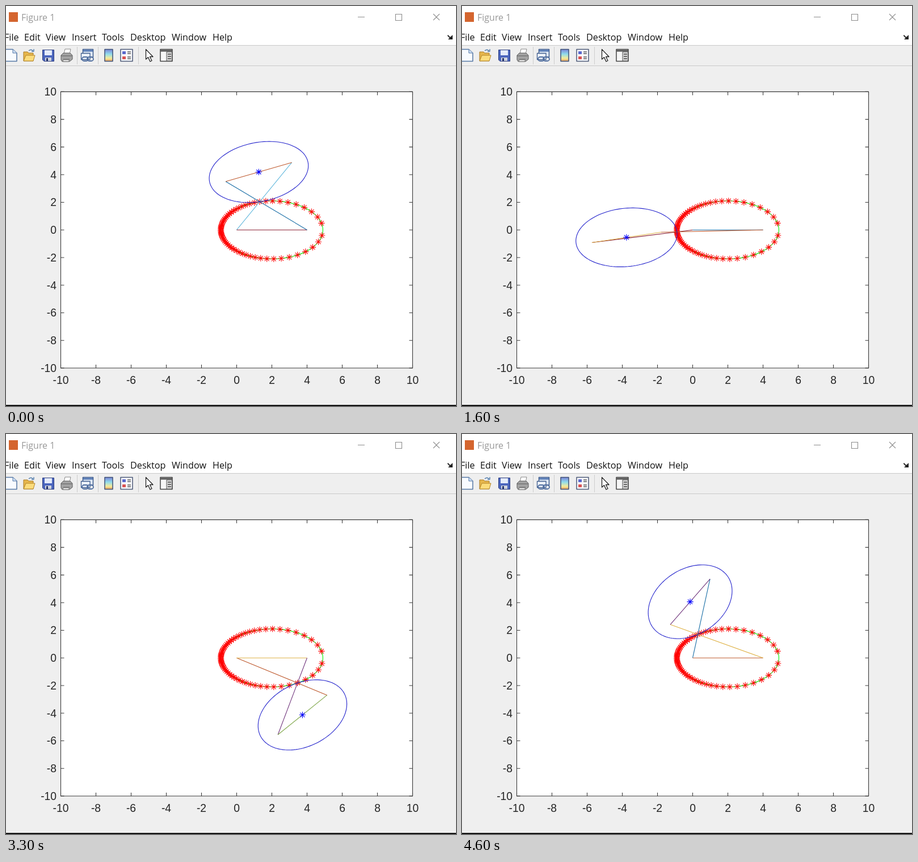
An HTML page for the animation above (4700 ms loop, 793x706 px).

```html
<!DOCTYPE html>
<html lang="en">
<head>
<meta charset="utf-8">
<title>Figure 1</title>
<style>
  html, body { margin: 0; width: 100%; height: 100%; overflow: hidden; background: #efefef; }
  svg { display: block; width: 793px; height: 706px; }
  .ui { font: 16.2px "Open Sans", "Noto Sans", sans-serif; }
  .tick { font: 19.3px "Liberation Sans", Arial, sans-serif; fill: #262626; }
  .thin { fill: none; stroke-width: 1.1; }
  #bars { filter: saturate(.75); }
</style>
</head>
<body>
<svg viewBox="0 0 793 706" xmlns="http://www.w3.org/2000/svg">
  <defs>
    <clipPath id="plotArea"><path class="box"/></clipPath>
    <linearGradient id="bar" x2="0" y2="1">
      <stop stop-color="#7d83d8"/><stop offset=".4" stop-color="#8fdcec"/>
      <stop offset=".75" stop-color="#f4ec9a"/><stop offset="1" stop-color="#eda05c"/>
    </linearGradient>
  </defs>

  <rect width="793" height="706" fill="#efefef"/>
  <rect width="793" height="69" fill="#fff"/>
  <path d="M0 69.5H793M0 105.5H793" stroke="#c9c9c9"/>
  <rect y="704" width="793" height="2" fill="#111"/>

  <!-- title bar -->
  <rect x="5" y="11" width="16" height="17" fill="#d4652f"/>
  <text class="ui" x="27" y="26" fill="#999" style="font-size:16px">Figure 1</text>
  <path d="M620 19.5H632M686.5 14.5H697.5V25.5H686.5ZM753 14L764 25M764 14L753 25" fill="none" stroke="#8c8c8c" stroke-width="1.1"/>

  <g class="ui" id="menu" fill="#111"></g>
  <path d="M778.5 51.5Q781 56 785 56" fill="none" stroke="#222" stroke-width="1.8"/>
  <path d="M787 51V59H779Z" fill="#222"/>

  <!-- toolbar -->
  <path d="M125.5 72V103M162.5 72V103M233.5 72V103" stroke="#cdcdcd"/>
  <g stroke-linejoin="round">
    <path d="M-2 76.5H12L19 83V97.5H-2Z" fill="#f8fbff" stroke="#5577a5" stroke-width="1.5"/>
    <path d="M12 76.5V83H19" fill="#cfe0f5" stroke="#5577a5"/>

    <path d="M31 97V81H38L40 83H48V97Z" fill="#e6b64c" stroke="#a97b25"/>
    <path d="M31 97L35 87H51L48 97Z" fill="#fbdc7c" stroke="#b48529"/>
    <path d="M40 79Q45 75 48 80M45 80H49V76" fill="none" stroke="#557fae" stroke-width="1.4"/>

    <path d="M64.5 77.5H84.5V97.5H67L64.5 95Z" fill="#4b65bd" stroke="#2c3d80"/>
    <path d="M68 78H81V87H68Z" fill="#e4ebfa"/>
    <path d="M69 91H80V97H69Z" fill="#cfd3dc"/>
    <path d="M71 92H74V97H71Z" fill="#26356e"/>

    <path d="M102 85L104 76H114L112 85Z" fill="#fff" stroke="#888"/>
    <path d="M97 87L101 83H113L117 87V94L112 98H99L97 95Z" fill="#a4a4a4" stroke="#5c5c5c"/>
    <path d="M97 88H116M101 94H112" stroke="#5c5c5c"/>
    <path d="M100 95H112L110 98H101Z" fill="#f5f5f5" stroke="#777"/>

    <path d="M135.5 76.5H153.5V90.5H135.5Z" fill="#dfe8f5" stroke="#3f5c8d" stroke-width="1.5"/>
    <path d="M136 79H153" stroke="#5277b3" stroke-width="3"/>
    <path d="M132.5 83.5H148V94.5H132.5Z" fill="#edf2fa" stroke="#3f5c8d" stroke-width="1.3"/>
    <g fill="none" stroke="#4d6c9e" stroke-width="1.8">
      <rect x="134" y="90" width="11" height="7" rx="3.5"/><rect x="143" y="90" width="11" height="7" rx="3.5"/>
    </g>

    <rect x="174" y="76.5" width="14" height="21" fill="url(#bar)" stroke="#3f5277" stroke-width="1.5"/>

    <rect x="202" y="76.5" width="21" height="21" fill="#fafbfe" stroke="#4d5a78" stroke-width="1.5"/>
    <path d="M205 80H211V85H205Z" fill="#5a68cc"/>
    <path d="M205 89H211V94H205Z" fill="#d85353"/>
    <path d="M214 81H220M214 84H220M214 90H220M214 93H220" stroke="#555" stroke-width="1.3"/>

    <path d="M246.5 76.5V94L250.5 90.5L254 98L257 96.5L253.5 89.5H259Z" fill="#fff" stroke="#222" stroke-width="1.3"/>

    <rect x="272" y="76.5" width="21" height="21" fill="#f6f6f6" stroke="#444" stroke-width="1.5"/>
    <path d="M272 79H293" stroke="#555" stroke-width="3"/>
    <path d="M283 81H292.5V97H283Z" fill="#d9d9d9" stroke="#555"/>
    <path d="M285 85H291M285 89H291M285 93H291" stroke="#444" stroke-width="1.4"/>
  </g>

  <!-- axes -->
  <path class="box" fill="#fff" stroke="#3a3a3a" stroke-width="1.1"/>
  <path id="ticks" class="thin" stroke="#3a3a3a"/>
  <g id="labels" class="tick"></g>

  <g clip-path="url(#plotArea)">
    <path id="fixed" class="thin" stroke="#0e0"/>
    <path id="trail" class="thin" stroke="#f00"/>
    <g id="bars"></g>
    <path id="rolling" class="thin" stroke="#2424cc"/>
    <path id="centre" class="thin" stroke="#00f"/>
  </g>
</svg>

<script>
const $ = id => document.getElementById(id);
const BAR = 5.8, GAP = 4;              // crank length and distance between foci
const A = BAR / 2, B = Math.sqrt(A * A - GAP * GAP / 4);
const LOOP = 4700, TICK = 100;
const COLORS = ['#0072bd', '#d95319', '#edb120', '#7e2f8e', '#77ac30', '#4dbeee', '#a2142f'];

const sx = x => 406.5 + x * 31;
const sy = y => 395.2 - y * 24.38;
const pt = ([x, y]) => sx(x).toFixed(2) + ' ' + sy(y).toFixed(2);
const line = (...pts) => 'M' + pts.map(pt).join('L');

function add(parent, tag, attrs, text = '') {
  const el = document.createElementNS('http://www.w3.org/2000/svg', tag);
  for (const key in attrs) el.setAttribute(key, attrs[key]);
  el.textContent = text;
  return parent.appendChild(el);
}

function ellipse(cx, cy, tilt) {
  const c = Math.cos(tilt), s = Math.sin(tilt), pts = [];
  for (let i = 0; i < 120; i++) {
    const t = i * Math.PI / 60, u = A * Math.cos(t), v = B * Math.sin(t);
    pts.push([cx + u * c - v * s, cy + u * s + v * c]);
  }
  return line(...pts) + 'Z';
}

function asterisk([x, y]) {
  const X = sx(x), Y = sy(y), r = 5.6, d = 4;
  return `M${X - r} ${Y}h${2 * r}M${X} ${Y - r}v${2 * r}` +
    `M${X - d} ${Y - d}l${2 * d} ${2 * d}M${X - d} ${Y + d}l${2 * d} ${-2 * d}`;
}

const radius = a => (BAR * BAR - GAP * GAP) / 2 / (BAR - GAP * Math.cos(a));
const polar = (r, a) => [r * Math.cos(a), r * Math.sin(a)];

// Crossed four-bar linkage: both cranks pass through the contact point
function pose(a) {
  const r = radius(a), [px, py] = polar(r, a), k = BAR / (BAR - r);
  return { p: polar(BAR, a), q: [GAP + (px - GAP) * k, py * k] };
}

const MENU = { File: -3, Edit: 32, View: 70, Insert: 116, Tools: 169, Desktop: 219, Window: 292, Help: 364 };
for (const name in MENU) add($('menu'), 'text', { x: MENU[name], y: 61 }, name);

const left = sx(-10), right = sx(10), top_ = sy(10), bottom = sy(-10);
for (const box of document.querySelectorAll('.box'))
  box.setAttribute('d', `M${left} ${top_}H${right}V${bottom}H${left}Z`);

let ticks = '';
for (let v = -10; v <= 10; v += 2) {
  const x = sx(v), y = sy(v);
  add($('labels'), 'text', { x, y: 666.5, 'text-anchor': 'middle' }, v);
  add($('labels'), 'text', { x: 89, y: y + 7, 'text-anchor': 'end' }, v);
  ticks += `M${x} ${top_}v6M${x} ${bottom}v-6M${left} ${y}h6M${right} ${y}h-6`;
}
$('ticks').setAttribute('d', ticks);
$('fixed').setAttribute('d', ellipse(GAP / 2, 0, 0));

let trail = '';
for (let i = 1; i <= 62; i++) trail += asterisk(polar(radius(i / 10), i / 10));
$('trail').setAttribute('d', trail);

const bars = [0, 1, 2, 3].map(() => add($('bars'), 'path', { class: 'thin' }));
// A flat line has no box to filter, so give the group some height
add($('bars'), 'path', { d: `M${left} ${top_}H${right}V${bottom}`, fill: 'none' });

function draw() {
  const n = Math.floor(performance.now() % LOOP / TICK);
  const step = Math.floor(10 + 1.46 * n);
  const { p, q } = pose(step % 63 / 10);
  const o = [0, 0], f = [GAP, 0];
  const mid = [(p[0] + q[0]) / 2, (p[1] + q[1]) / 2];
  [[o, p], [o, f], [f, q], [p, q]].forEach((ends, i) => {
    bars[i].setAttribute('d', line(...ends));
    bars[i].setAttribute('stroke', COLORS[(step * 4 + i) % 7]);
  });
  $('rolling').setAttribute('d', ellipse(...mid, Math.atan2(p[1] - q[1], p[0] - q[0])));
  $('centre').setAttribute('d', asterisk(mid));
  requestAnimationFrame(draw);
}
draw();
</script>
</body>
</html>
```
